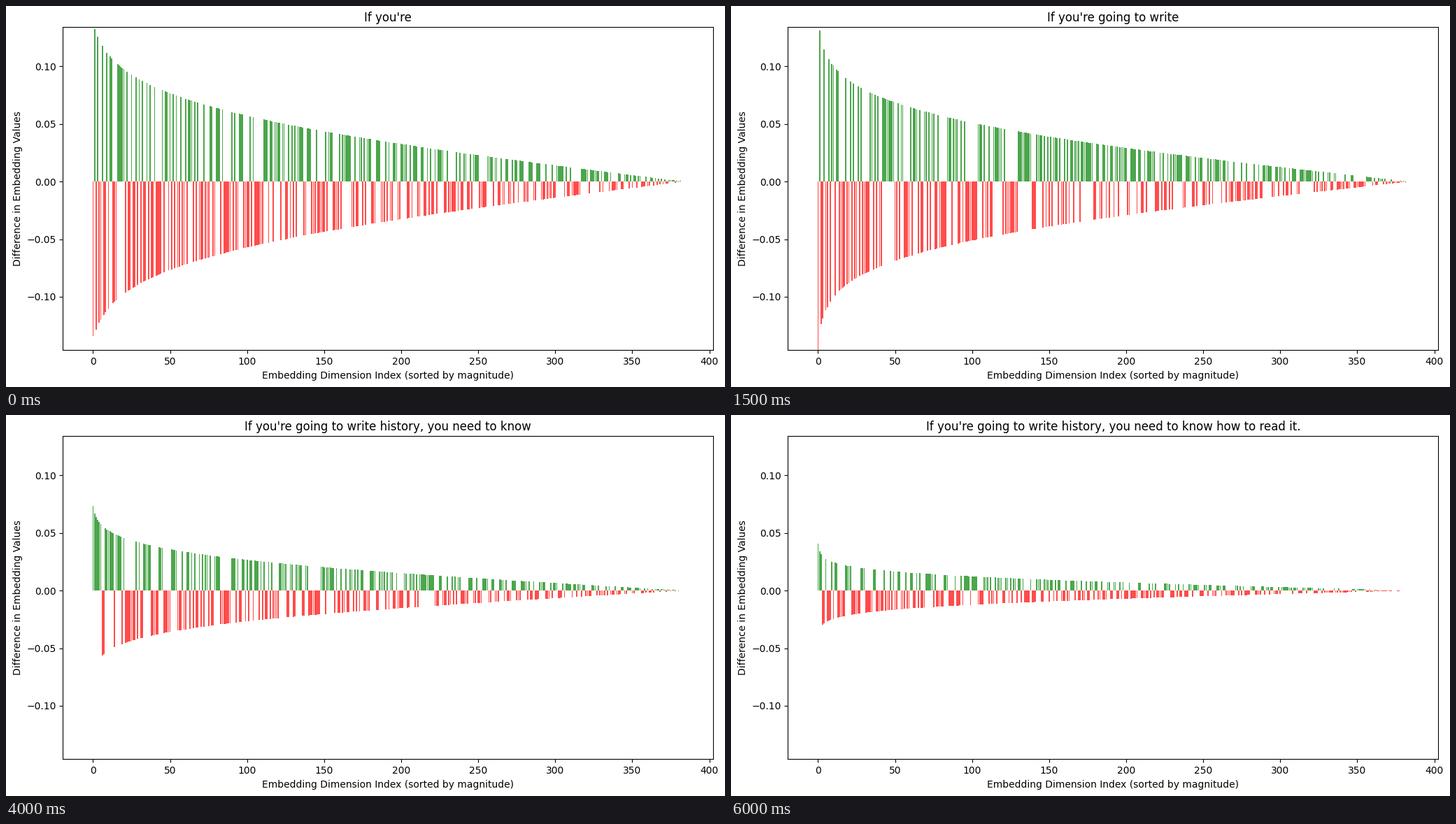
Recreate the animation shown at these times as a matplotlib script. Size 1028 px wide and 545 px high, loop 6.5 s.

```python
import math

import numpy as np
import matplotlib.pyplot as plt
from matplotlib.animation import FuncAnimation

WIDTH, HEIGHT, DPI = 1028, 545, 100
DIMS = 384
RANKS = np.arange(DIMS)

# Per added word: spread and peak of the differences, signs of the tallest bars
STEPS = [
    ("If you're", 0.0510, 0.1340, "-+-+--+-"),
    ("going", 0.0440, 0.1415, "-"),
    ("to", 0.0235, 0.0727, "+----+++"),
    ("write", 0.0456, 0.1465, "-"),
    ("history,", 0.0390, 0.1270, "--+-+-+-"),
    ("you", 0.0245, 0.0780, "-"),
    ("need", 0.0250, 0.1020, "++-+-+++"),
    ("to", 0.0190, 0.0550, "-"),
    ("know", 0.0238, 0.0733, "++++++--"),
    ("how", 0.0187, 0.0533, "++------"),
    ("to", 0.0165, 0.0450, "-"),
    ("read", 0.0146, 0.0465, "-"),
    ("it.", 0.0110, 0.0405, "+++--+--"),
]


def half_normal_quantiles():
    """Expected sorted magnitudes of DIMS normally distributed values."""
    z = np.linspace(0, 4, 2001)
    share_below = [math.erf(v / math.sqrt(2)) for v in z]
    return np.interp(1 - (RANKS + 0.5) / DIMS, share_below, z)


QUANTILES = half_normal_quantiles()


def differences(step):
    _, spread, peak, lead = STEPS[step]
    values = spread * QUANTILES
    # Bend only the tallest bars so that the first one reaches the peak
    values = values * (peak / values[0]) ** ((QUANTILES / QUANTILES[0]) ** 6)
    signs = np.random.default_rng(40 + step).choice([-1, 1], DIMS)
    signs[:len(lead)] = [1 if c == "+" else -1 for c in lead]
    return values * signs


fig = plt.figure(figsize=(WIDTH / DPI, HEIGHT / DPI), dpi=DPI)
ax = fig.add_axes([81.3 / WIDTH, 52.55 / HEIGHT, 930 / WIDTH, 462 / HEIGHT])
bars = ax.bar(RANKS, np.zeros(DIMS), width=0.8, alpha=0.7)
ax.set_xlim(-19.59, 402.59)
ax.set_ylim(-0.1465, 0.134)
ax.set_xlabel("Embedding Dimension Index (sorted by magnitude)")
ax.set_ylabel("Difference in Embedding Values")
title = ax.set_title("")


def update(step):
    title.set_text(" ".join(word for word, *_ in STEPS[:step + 1]))
    for bar, value in zip(bars, differences(step)):
        bar.set_height(value)
        bar.set_facecolor("green" if value > 0 else "red")
    return [title, *bars]


anim = FuncAnimation(fig, update, frames=len(STEPS), interval=500, repeat=True, repeat_delay=0)
plt.show()
```
